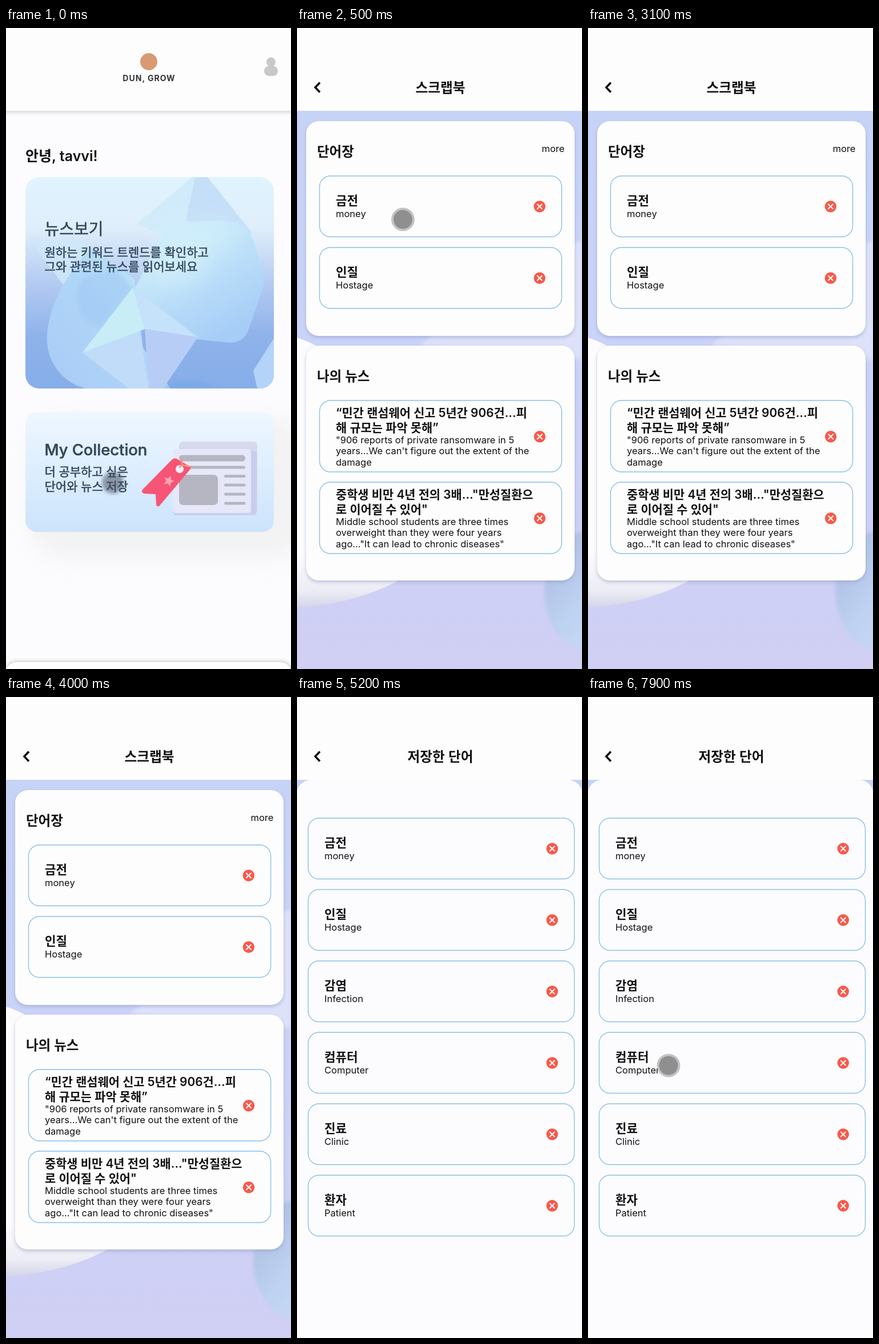
An HTML page that plays this animation: 499x1122 px, repeating every 8 s.

```html
<!DOCTYPE html>
<html lang="ko">
<head>
<meta charset="utf-8">
<title>Word collection app</title>
<style>
  html, body { margin: 0; width: 100%; height: 100%; overflow: hidden; background: #fdfdfd; }
  svg { display: block; width: 499px; height: 1122px; }
  text { font-family: Inter, "Noto Sans CJK KR", "Noto Sans CJK", sans-serif; fill: #111; white-space: pre; }
  .ink { fill: #34475c; stroke: #34475c; stroke-width: .55px; }
</style>
</head>
<body>
<svg id="stage" viewBox="0 0 499 1122" xmlns="http://www.w3.org/2000/svg">
  <defs>
    <linearGradient id="newsBg" x1="0" y1="0" x2="0" y2="1">
      <stop offset="0" stop-color="#e0f4fe"/><stop offset=".24" stop-color="#dfeefb"/>
      <stop offset=".5" stop-color="#b4cbf2"/><stop offset=".75" stop-color="#8fb2ea"/>
      <stop offset="1" stop-color="#86aee9"/>
    </linearGradient>
    <linearGradient id="collBg" x1="0" y1="0" x2="0" y2="1">
      <stop offset="0" stop-color="#eef7ff"/><stop offset="1" stop-color="#cce4fc"/>
    </linearGradient>
    <linearGradient id="scrapBg" x1="0" y1="0" x2="0" y2="1">
      <stop offset="0" stop-color="#c4d3f6"/><stop offset=".5" stop-color="#cad3f8"/>
      <stop offset="1" stop-color="#d0cff4"/>
    </linearGradient>
    <linearGradient id="gem" x1="0" y1="0" x2=".6" y2="1">
      <stop offset="0" stop-color="#d2f1fa"/><stop offset=".5" stop-color="#bfe2f9"/>
      <stop offset="1" stop-color="#a6cdf6"/>
    </linearGradient>
    <linearGradient id="ring" x1="1" y1="0" x2="0" y2="1">
      <stop offset="0" stop-color="#c2ebf9"/><stop offset=".5" stop-color="#b0d6f7"/>
      <stop offset="1" stop-color="#a8caf6"/>
    </linearGradient>
    <linearGradient id="pebble" x1="0" y1="0" x2="0" y2="1">
      <stop offset=".8" stop-color="#fcfcfe"/><stop offset=".94" stop-color="#ececf5"/>
      <stop offset="1" stop-color="#d4d5e8"/>
    </linearGradient>
    <linearGradient id="ball" x1="0" y1="0" x2="1" y2="1">
      <stop offset="0" stop-color="#a9b8dd"/><stop offset=".5" stop-color="#bed2f1"/>
      <stop offset="1" stop-color="#cfddf7"/>
    </linearGradient>
    <filter id="soft" x="-20%" y="-20%" width="140%" height="140%"><feGaussianBlur stdDeviation="3"/></filter>
    <filter id="wide" x="-30%" y="-40%" width="160%" height="180%"><feGaussianBlur stdDeviation="18"/></filter>
    <clipPath id="newsClip"><rect x="34" y="261" width="435" height="370" rx="24"/></clipPath>
  </defs>
</svg>
<script>
const LOOP = 8000;
const stage = document.getElementById('stage');

const rect = (x, y, w, h, r, fill, extra = '') =>
  `<rect x="${x}" y="${y}" width="${w}" height="${h}" rx="${r}" fill="${fill}" ${extra}/>`;
const circle = (x, y, r, fill, extra = '') =>
  `<circle cx="${x}" cy="${y}" r="${r}" fill="${fill}" ${extra}/>`;
const path = (d, fill, extra = '') => `<path d="${d}" fill="${fill}" ${extra}/>`;
const text = (x, y, size, str, weight = 400, extra = '') =>
  `<text x="${x}" y="${y}" font-size="${size}" font-weight="${weight}" ${extra}>${str}</text>`;
const dark = (x, y, size, str) => text(x, y, size, str, 500, 'class="ink"');
const small = (x, y, str) => text(x, y, 16.5, str);
const middle = 'text-anchor="middle"';

const box = (x, y, w, h) =>
  rect(x, y, w, h, 19, 'none', 'stroke="#8dc0e3" stroke-width="1.4"');
const remove = (x, y) => circle(x, y, 10.2, '#f9584a') +
  path(`M${x - 4} ${y - 4}l8 8m0 -8l-8 8`, 'none', 'stroke="#fff" stroke-width="2" stroke-linecap="round"');
const header = title => rect(0, 0, 499, 145, 0, '#fdfdfd') +
  path('M40 95.5L32 104L40 112.5', 'none', 'stroke="#111" stroke-width="3.6"') +
  text(251, 113.3, 23.7, title, 600, middle);
const panel = (y, h) =>
  rect(16, y + 3, 470, h, 22, '#8b94bb', 'opacity=".5" filter="url(#soft)"') +
  rect(16, y, 470, h, 22, '#fdfdfe');
const word = (x, y, w, ko, en) => box(x, y, w, 106.5) +
  text(x + 28.5, y + 51, 21.2, ko, 600) + small(x + 28.5, y + 72, en) +
  remove(x + w - 38.7, y + 53.5);
const article = (y, titles, lines) => box(39.5, y, 424, 125) +
  titles.map((s, i) => text(68, y + 29 + i * 25.5, 20.85, s, 600)).join('') +
  lines.map((s, i) => small(68, y + 74.5 + i * 19.8, s)).join('') +
  remove(425, y + 63.3);

function newsCard() {
  return rect(34, 261, 435, 370, 24, 'url(#newsBg)') + `<g clip-path="url(#newsClip)">` +
    path('M228 344L326 261H354L432 360L300 372Z', '#d2ebfa') +
    path('M331 261H352L432 360L315 338Z', '#c5dff8') +
    path('M40 368L140 372L172 400L112 466Z', '#cfe8f9', 'opacity=".85"') +
    path('M150 385C95 440 65 510 73 560C82 605 118 634 165 634H290L240 560L225 440Z', 'url(#ring)') +
    path('M136 437C112 475 130 520 165 525L222 455L190 420Z', '#9cc4f2', 'opacity=".45" filter="url(#soft)"') +
    path('M282 348Q350 331 398 340Q424 345 433 372L451 428Q455 444 448 460L424 530Q415 551 392 551L335 545L262 524Q240 500 226 455Z', 'url(#gem)') +
    path('M240 440Q320 470 342 430Q360 395 416 355Q395 340 350 342L285 352Z', '#dcf5fb', 'opacity=".45" filter="url(#wide)"') +
    path('M222 455L134 568L215 631H250Z', '#c1dcf8') +
    path('M222 455L243 527L134 568Z', '#c8edf7') +
    path('M222 455L336 541L243 527Z', '#c6e2fa') +
    path('M243 527L336 541L275 631H250Z', '#b8cdf6') +
    path('M275 631Q315 600 372 631Z', '#73a8e4', 'opacity=".6" filter="url(#soft)"') +
    path('M469 543L433 600L440 631H469Z', '#b4d3f8') + '</g>' +
    dark(67.5, 362, 28, '뉴스보기') +
    dark(67.5, 400, 21, '원하는 키워드 트렌드를 확인하고') +
    dark(67.5, 425, 21, '그와 관련된 뉴스를 읽어보세요');
}

function collectionCard() {
  const grey = '#b5b6c1';
  const bar = (x, y, w, h) => rect(x, y, w, h, h / 2, grey);
  const star = Array.from({ length: 10 }, (_, i) => {
    const a = i * Math.PI / 5 - 1.2, r = i % 2 ? 4.5 : 10;
    return `${(285 + r * Math.cos(a)).toFixed(1)},${(793 + r * Math.sin(a)).toFixed(1)}`;
  }).join(' ');
  return rect(44, 680, 480, 250, 60, '#b8b9b6', 'opacity=".14" filter="url(#wide)"') +
    rect(34, 673, 435, 209, 20, 'url(#collBg)') +
    rect(303, 724, 137, 126, 7, '#d7d9ee') +
    rect(292, 740, 147, 113, 6, '#c6cbec', 'opacity=".8"') +
    rect(292, 737, 137, 112, 5, '#e6e7f8') +
    bar(303, 747.5, 116, 11) + bar(303, 766.5, 116, 5) +
    rect(303, 782, 68, 53, 7, grey) +
    [782, 797.5, 813.5, 829.5].map(y => bar(382, y, 37.5, 5)).join('') +
    path('M299 754L321 767Q325 770 322 773L269 836Q265 840 263 834L262 816L242 815Q236 813 239 808L291 755Q295 752 299 754Z', '#f65575') +
    `<polygon points="${star}" fill="#f9a3b5"/>` +
    circle(304, 772, 7, '#f6efff') +
    path('M304 769L309 765L307 753M309 765L325 768', 'none', 'stroke="#f19a7c" stroke-width="2.5" stroke-linecap="round"') +
    dark(67.5, 748, 27.4, 'My Collection') +
    dark(67.5, 784, 21, '더 공부하고 싶은') + dark(67.5, 810, 21, '단어와 뉴스 저장');
}

const home = () => rect(0, 0, 499, 1122, 0, '#fcfcfe') +
  rect(-10, 60, 519, 88, 0, '#c9c9cd', 'opacity=".75" filter="url(#soft)"') +
  rect(0, 0, 499, 145, 0, '#fdfdfd') +
  circle(250, 59, 15, '#d99a72') +
  text(250.5, 93, 14, 'DUN, GROW', 700, middle + ' letter-spacing="1" style="fill:#333"') +
  circle(464, 59.5, 8, '#c9c7c9') + rect(452, 66.5, 24, 17.5, 8.5, '#c9c7c9') +
  text(34, 233, 25, '안녕, tavvi!', 600) +
  newsCard() + collectionCard() +
  rect(-2, 1108, 503, 60, 20, '#bbbbc0', 'opacity=".7" filter="url(#soft)"') +
  rect(-1, 1110, 501, 60, 20, '#fdfdfd');

const scrapbook = () => rect(0, 0, 499, 1122, 0, 'url(#scrapBg)') +
  path('M499 372Q462 380 400 430Q300 480 215 556L499 580Z', '#dde2fa', 'filter="url(#soft)"') +
  path('M0 542Q60 560 130 640L190 960Q110 1008 0 1014Z', 'url(#pebble)') +
  `<ellipse cx="512" cy="985" rx="79" ry="105" fill="url(#ball)" filter="url(#soft)"/>` +
  header('스크랩북') + panel(163, 376) + panel(556, 411) +
  text(35, 224.7, 23.5, '단어장', 600) + small(428.5, 217, 'more') +
  word(39.5, 259, 424, '금전', 'money') + word(39.5, 384.3, 424, '인질', 'Hostage') +
  text(35, 617.7, 23.5, '나의 뉴스', 600) +
  article(652, ['“민간 랜섬웨어 신고 5년간 906건...피', '해 규모는 파악 못해”'],
    ['"906 reports of private ransomware in 5', "years...We can't figure out the extent of the", 'damage']) +
  article(795, ['중학생 비만 4년 전의 3배..."만성질환으', '로 이어질 수 있어"'],
    ['Middle school students are three times', 'overweight than they were four years', 'ago..."It can lead to chronic diseases"']);

const words = () => rect(0, 0, 499, 1122, 0, '#c5d3f6') + header('저장한 단어') +
  rect(-1, 145, 501, 1000, 26, '#fcfcfe') +
  [['금전', 'money'], ['인질', 'Hostage'], ['감염', 'Infection'],
   ['컴퓨터', 'Computer'], ['진료', 'Clinic'], ['환자', 'Patient']]
    .map(([ko, en], i) => word(19.5, 212 + i * 125, 466, ko, en)).join('');

const bubble = () => rect(-4, 1092, 167, 40, 4, '#a9c1e4', 'opacity=".75"') +
  text(4, 1118, 20.5, 'j9e204a.p.ssa...', 400, 'style="font-family:\'Open Sans\',sans-serif;fill:#8f9ab5"');
const press = () => circle(187, 796, 19, '#45505f', 'opacity=".55" filter="url(#soft)"');
const pointer = () => circle(0, 0, 20.5, '#c3c3c3') + circle(0, 0, 16.5, '#8f8f8f');

const layers = {};
for (const [id, draw] of Object.entries({ home, scrapbook, words, bubble, press, pointer })) {
  const g = document.createElementNS('http://www.w3.org/2000/svg', 'g');
  g.innerHTML = draw();
  stage.append(g);
  layers[id] = g;
}

// [time, opacity] steps; equal neighbours hold, close ones cut
const fades = {
  home: [[0, 1], [299, 1], [300, 0]],
  scrapbook: [[299, 0], [300, 1], [4999, 1], [5000, 0]],
  words: [[4999, 0], [5000, 1]],
  bubble: [[4600, 0], [4800, .75], [4900, 1], [5000, 1], [5200, 0]],
  press: [[0, 1], [100, .8], [250, 0]],
  pointer: [[399, 0], [400, 1], [800, 1], [950, 0], [7450, 0], [7550, 1]]
};

function valueAt(steps, t) {
  const next = steps.findIndex(s => s[0] > t);
  if (next === 0) return steps[0][1];
  if (next < 0) return steps[steps.length - 1][1];
  const [t0, a] = steps[next - 1], [t1, b] = steps[next];
  return a + (b - a) * (t - t0) / (t1 - t0);
}

const start = performance.now();
function frame() {
  const t = (performance.now() - start) % LOOP;
  for (const id in fades) {
    const v = valueAt(fades[id], t);
    layers[id].style.display = v > 0 ? '' : 'none';
    layers[id].style.opacity = v;
  }
  layers.pointer.setAttribute('transform', t < 4000 ? 'translate(185.5 335)' : 'translate(141 645)');
  requestAnimationFrame(frame);
}
frame();
</script>
</body>
</html>
```
